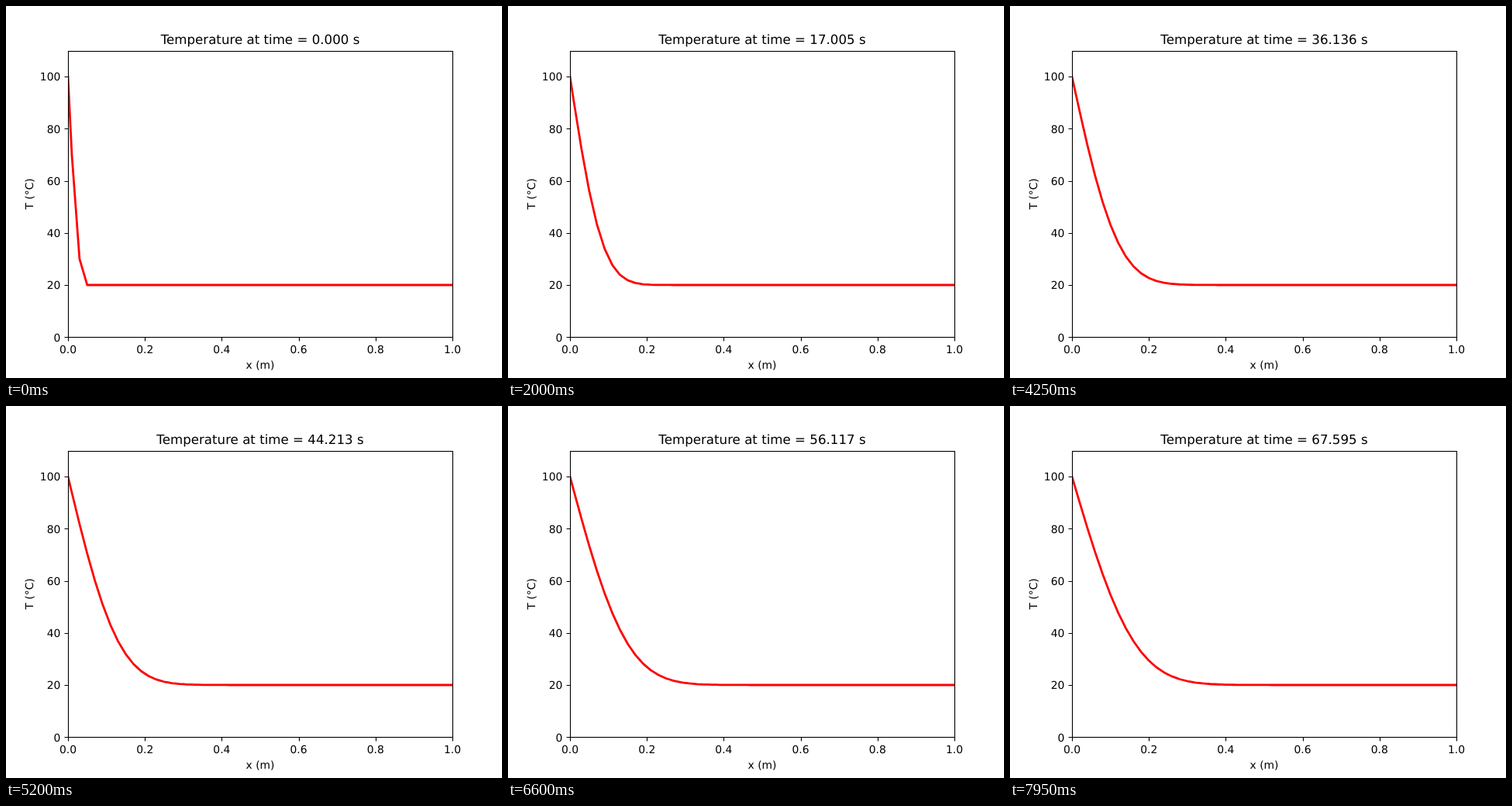
Write an HTML page that moves like this. It is 640 px wide and 480 px high and loops after 8000 ms.

```html
<!DOCTYPE html>
<html lang="en">
<head>
<meta charset="utf-8">
<title>Heat conduction in a rod</title>
<style>
  html, body { margin: 0; width: 100%; height: 100%; overflow: hidden; background: #fff; }
  svg { display: block; width: 640px; height: 480px; }
  text { font: 13.889px "DejaVu Sans", sans-serif; fill: #000; text-anchor: middle; text-rendering: geometricPrecision; }
  #title { font-size: 16.667px; }
  .left text { text-anchor: end; }
  .axes { fill: none; stroke: #000; stroke-width: 1.111; }
  #curve { fill: none; stroke: #f00; stroke-width: 2.778; stroke-linejoin: round; stroke-linecap: square; }
</style>
</head>
<body>
<svg viewBox="0 0 640 480">
  <clipPath id="plot"><rect x="80" y="58" width="496" height="369"/></clipPath>
  <g clip-path="url(#plot)"><polyline id="curve"/></g>
  <path id="ticks" class="axes"/>
  <rect class="axes" x="80.5" y="58.5" width="496" height="369"/>
  <g id="xLabels"></g>
  <g id="yLabels" class="left"></g>
  <text x="328" y="468">x (m)</text>
  <text transform="translate(35 242.4) rotate(-90)">T (°C)</text>
  <text id="title" x="328" y="49"></text>
</svg>
<script>
const FRAME_MS = 50, FRAMES = 160;
const CELLS = 100, WARMUP_STEPS = 4, STEP_SECONDS = 0.425126;
const $ = id => document.getElementById(id);

const toX = x => 80 + 496 * x;
const toY = t => 427.2 - 369.6 * t / 110;
const snap = v => Math.round(v) + 0.5;

function addLabel(group, x, y, content) {
  const label = document.createElementNS("http://www.w3.org/2000/svg", "text");
  label.setAttribute("x", x);
  label.setAttribute("y", y);
  label.textContent = content;
  group.append(label);
}

function drawAxes() {
  let ticks = "";
  for (let i = 0; i <= 5; i++) {
    const x = toX(i / 5), y = toY(i * 20);
    ticks += `M${snap(x)} 427.5v5M80.5 ${snap(y)}h-5`;
    addLabel($("xLabels"), x, 448, (i / 5).toFixed(1));
    addLabel($("yLabels"), 70.3, Math.round(y + 5.3), i * 20);
  }
  $("ticks").setAttribute("d", ticks);
}

// Explicit heat equation at its stability limit: each cell becomes its neighbours' mean.
const diffuse = rod => rod.map((t, i) =>
  i === 0 || i === CELLS ? t : (rod[i - 1] + rod[i + 1]) / 2);

function simulate() {
  let rod = Array.from({ length: CELLS + 1 }, (_, i) => i ? 20 : 100);
  for (let i = 0; i < WARMUP_STEPS; i++) rod = diffuse(rod);
  const states = [];
  for (let i = 0; i < FRAMES; i++) {
    states.push(rod);
    rod = diffuse(rod);
  }
  return states;
}

const toPoints = rod =>
  rod.map((t, i) => `${toX(i / CELLS).toFixed(2)},${toY(t).toFixed(3)}`).join(" ");

const curves = simulate().map(toPoints);
const start = performance.now();
let shown = -1;

function render() {
  const frame = Math.floor((performance.now() - start) / FRAME_MS) % FRAMES;
  if (frame !== shown) {
    shown = frame;
    $("curve").setAttribute("points", curves[frame]);
    $("title").textContent = `Temperature at time = ${(frame * STEP_SECONDS).toFixed(3)} s`;
  }
  requestAnimationFrame(render);
}

drawAxes();
render();
</script>
</body>
</html>
```
